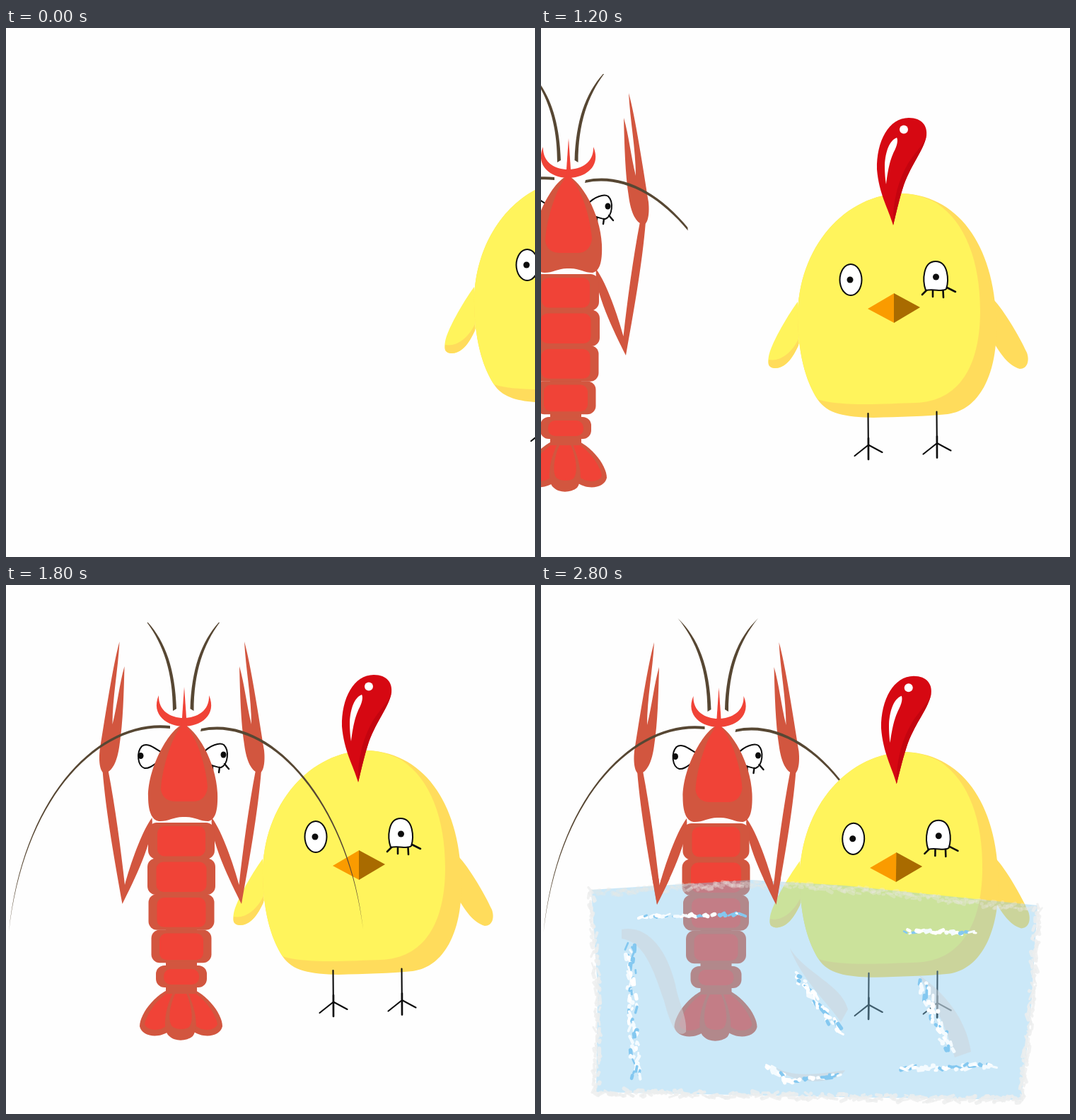
An HTML page with a canvas for the animation above (3.3 s loop, 748x748 px).

```html
<!DOCTYPE html>
<html lang="en">
<head>
<meta charset="utf-8">
<title>Shrimp and chick</title>
<style>
html, body { margin: 0; width: 100%; height: 100%; overflow: hidden; background: #fefefe; }
canvas { display: block; width: 100%; height: 100%; }
</style>
</head>
<body>
<canvas id="c" width="748" height="748"></canvas>
<script>
const g = document.getElementById('c').getContext('2d');
const LOOP = 3300, STEP = 200, SIZE = 748;
const YELLOW = '#fff45c', AMBER = '#ffdc5c', RED = '#f04337', RUST = '#d2563f', BROWN = '#574733',
      INK = '#0c0c0c', PAINT = '#f7e80b', CREAM = '#fffff0', BLOB = '#f05d4b', PAPER = '#fefefe';

// Offsets per 200 ms step; the last chick pose is its resting place.
const chickStops = [[299, -21], [255, -4], [150, 2], [73, -2], [0, 0]];
const shrimpStops = [[-303, -6], [-139, 6], [-77, -6], [0, 0], [74, -6]];

function fill(d, color) {
  g.fillStyle = color;
  g.fill(new Path2D(d));
}

function line(d, color, width) {
  g.strokeStyle = color;
  g.lineWidth = width;
  g.stroke(new Path2D(d));
}

function outlined(d, width) {
  fill(d, '#fff');
  line(d, INK, width);
}

function oval(x, y, rx, ry, color) {
  g.beginPath();
  g.ellipse(x, y, rx, ry, 0, 0, 7);
  g.fillStyle = color;
  g.fill();
}

function box(x, y, w, h, r, color) {
  g.beginPath();
  g.roundRect(x, y, w, h, r);
  g.fillStyle = color;
  g.fill();
}

function group(draw) {
  g.save();
  draw();
  g.restore();
}

function mirror(axis2, draw) {
  draw();
  group(() => {
    g.transform(-1, 0, 0, 1, axis2, 0);
    draw();
  });
}

function rng(seed) {
  return () => (seed = (seed * 16807) % 2147483647) / 2147483647;
}

const mix = (a, b, k) => a + (b - a) * k;

function leg() {
  line('M462.5 545 L463 610 M463 589.5 L443.5 605 M463 589.5 L482.5 600', INK, 2.1);
  line('M463 580 V610', INK, 2.6);
}

function chick() {
  const left = 'M512 234 C430 234 363 310 363 410 C364 470 378 505 391 525';
  fill('M363 387 C345 412 325 448 322 464 C320 475 322 481 332 481 C348 480 358 463 365 446Z', YELLOW);
  fill('M322 469 C338 472 354 460 364 440 L364 449 C355 468 345 481 330 481 C321 480 321 475 322 469Z', AMBER);
  fill('M640 384 C655 400 676 435 687 459 C691 470 688 482 677 482 C660 477 650 460 642 448Z', AMBER);
  fill(left + ' C405 546 430 550 470 551 C505 550 545 549 575 546 C620 540 644 490 644 425 C644 315 595 238 512 234Z', AMBER);
  fill(left + ' C425 536 490 531 530 530 C590 528 621 480 621 400 C621 330 600 275 560 248 C545 239 528 235 512 234Z', YELLOW);

  fill('M498 279 C491 255 478 235 475 200 C474 160 492 127 520 127 C539 127 547 139 545 153 C540 175 525 190 513 222 C507 240 502 262 498 279Z', '#d60812');
  fill('M545 153 C540 175 525 190 513 222 C507 240 502 262 498 279 C497 245 505 215 520 190 C532 172 541 165 545 153Z', '#c4040f');
  fill('M503 155 C493 159 487 174 486 194 C486 206 487 215 488 221 C491 197 494 186 499 175 C504 166 505 158 503 155Z', '#fff');
  oval(513, 143.5, 6, 6, '#fff');

  oval(438, 356, 16.5, 23, INK);
  oval(438, 356, 14.5, 21, '#fff');
  oval(437, 356, 4.5, 4.5, INK);
  outlined('M544 371 C539 357 540 330 558 330 C576 330 577 357 573 369 C567 374 556 368 544 371Z', 2);
  oval(558.5, 352, 4.5, 4.5, INK);
  line('M545 371 L539 377 M554 371 V380 M568.5 371 L569 381 M574 367 L586 373', INK, 2.6);

  fill('M462 397 L499.5 375 V417Z', '#fa9b00');
  fill('M499 375 L536 395 L499 417Z', '#a96b00');
  leg();
  group(() => {
    g.translate(97, -2.5);
    leg();
  });
}

function claw() {
  fill('M263 86 C272 118 283 190 291 240 C293 260 289 272 284 272 C273 270 266 255 263 232 C258 200 257 160 256 121 C263 145 266 175 273 203 C273 165 265 125 263 86Z', RUST);
  fill('M287 268 C282 330 269 400 259 457 C243 425 213 365 217 335 C232 355 248 402 255.5 430 C261 380 269 320 279 268Z', RUST);
}

const claws = () => mirror(349.5, claw);

function tail() {
  mirror(347, () => {
    fill('M171 573 C140 578 115 612 115 630 C118 645 143 648 158 636Z', RUST);
    fill('M166 577 C145 584 125 610 122 627 C126 637 143 637 152 630Z', RED);
  });
  fill('M168 573 C152 595 145 635 157 644 C165 652 182 651 190 644 C201 630 191 595 179 573Z', RUST);
  fill('M169 577 C158 595 153 624 162 631 C168 635 180 635 185 631 C193 620 187 595 178 577Z', RED);
}

function belly() {
  box(152, 384, 44, 200, 2, RUST);
  for (let i = 0; i < 5; i++) {
    const half = 48 - 1.25 * (i - 0.9) ** 2, y = 342 + 50.5 * i, h = 51.5 - 0.02 * i ** 5;
    const inner = half - 13 + i * 0.5;
    box(174 - half, y, half * 2, h, 12, RUST);
    box(174 - inner, y + 5, inner * 2, h - 9, 10, RED);
  }
}

function shrimp() {
  outlined('M147 243 C136 237 126 228 118 234 C110 243 112 262 122 265 C132 266 139 255 147 253Z', 2);
  oval(116.5, 247.5, 4, 4.5, INK);
  outlined('M205 243 C214 233 228 228 234 232 C242 240 240 260 230 264 C222 264 212 259 205 256Z', 2);
  oval(233.5, 246, 4, 4.5, INK);
  line('M218 262 V268 M228 264 L227 271 M235 259 L241 266', INK, 2.4);

  claws();
  fill('M158 205 C60 194 -50 301 -70 497 C-48 303 60 198 158 209Z', BROWN);
  fill('M202 209 C300 187 411 313 431 492 C409 316 300 191 201 213Z', BROWN);
  mirror(353.5, () => fill('M120 52 C149 80 165 120 167 181 L162 184 C162 125 146 84 120 52Z', BROWN));

  tail();
  belly();

  fill('M177 203 C158 208 127 262 127 305 C127 330 134 340 144 340 C156 340 165 333 178 334 C192 333 200 340 212 340 C222 338 226 325 225 300 C223 255 195 210 177 203Z', RUST);
  fill('M177 203 C163 212 146 265 145 295 C147 308 156 312 166 312 H192 C203 312 210 303 211 292 C208 255 192 212 177 203Z', RED);
  fill('M142 162 C130 190 155 206 177 206 C201 206 225 190 213 162 C214 184 196 194 177 194 C159 194 141 184 142 162Z', RED);
  fill('M178 150 L174 208 H182Z', RED);
}

// Strokes fanned out from a hub, angles in degrees, reach running from r1 to r2.
function spokes(x, y, color, width, from, to, n, r1, r2) {
  for (let i = 0; i < n; i++) {
    const k = n > 1 ? i / (n - 1) : 0;
    const a = mix(from, to, k) * Math.PI / 180, r = mix(r1, r2, k) + 6 * Math.sin(i * 2.4);
    line(`M${x} ${y} L${x + r * Math.cos(a)} ${y + r * Math.sin(a)}`, color, width);
  }
}

function soft(d, color, width) {
  group(() => {
    g.shadowColor = color;
    g.shadowBlur = 4;
    line(d, color, width);
  });
}

// A scribble that swings wider and wider along its way.
function scribble(x1, y1, x2, y2, n, sx, sy) {
  const points = Array.from({ length: n }, (_, i) => {
    const k = i / (n - 1), swing = (0.3 + 0.7 * k) * (i % 2 ? -1 : 1);
    return `${mix(x1, x2, k) + sx * swing} ${mix(y1, y2, k) + sy * swing}`;
  });
  return 'M' + points.join(' L');
}

function splat() {
  const rays = (...args) => spokes(505, 380, PAINT, ...args);
  g.beginPath();
  g.rect(225, 0, 523, 637);
  g.clip();

  oval(505, 390, 195, 205, PAINT);
  rays(20, 219, 229, 5, 290, 330);
  rays(20, 230, 244, 5, 305, 213);
  rays(20, 211, 166, 11, 232, 256);
  rays(20, 160, 150, 3, 240, 210);
  rays(18, 138, 64, 16, 250, 280);
  rays(18, 64, 33, 7, 280, 232);
  rays(18, 51, 51, 1, 328, 328);
  rays(19, 28, -33, 8, 300, 300);
  rays(15, -40, -57, 4, 370, 272);
  rays(19, -67, -76, 3, 272, 300);
  rays(20, -86, -108, 4, 232, 228);
  line('M216 313 L330 268 M284 45 Q345 85 371 124 M394 66 L402 75 M545 -5 Q543 50 531 92 M223 567 H224 M272 582 L229 638', PAINT, 18);
  fill('M429 540 L446 574 C450 585 460 585 463 576 L471 558 L473 590 L455 603 L429 598Z', PAPER);
  line('M422 590 V640', PAPER, 9);

  soft(scribble(372, 222, 442, 233, 6, -14, -26), CREAM, 16);
  soft(scribble(570, 288, 650, 332, 7, -20, 11) + ' L700 374', CREAM, 16);
  soft('M402 414 L352 453 C340 410 360 408 373 416 M410 468 L398 499 M423 463 L417 594', CREAM, 16);
  soft('M516 505 L546 527 L535 480 L586 507 M580 475 L714 605', CREAM, 16);

  oval(488, 368, 56, 64, BLOB);
  for (let a = 8; a < 368; a += 24) {
    const r = 92 + 22 * Math.cos(a * Math.PI / 180);
    spokes(488, 368, BLOB, 19, a, a, 1, r, r);
  }
  line('M648 444 Q600 440 530 380 M388 480 L440 360 M534 264 L510 340', BLOB, 18);
}

function flash() {
  g.fillStyle = PAINT;
  g.fillRect(0, 0, SIZE, SIZE);
  soft(scribble(95, 158, 192, 172, 8, -20, -46), CREAM, 19);
  soft('M214 196 L175 105 Q200 100 240 184 L375 425 L408 470', CREAM, 19);
  soft(scribble(372, 202, 483, 207, 9, 20, -55) + ' Q480 270 432 375 L418 455', CREAM, 19);
  spokes(475, 406, CREAM, 19, -67, -25, 3, 90, 102);
  soft('M470 352 L440 389 M609 408 Q570 396 497 437 L495 452 Q590 452 657 502', CREAM, 19);
  soft('M169 402 Q97 500 91 544 M175 452 Q145 510 132 575 L186 478 Q155 590 141 658 L158 642', CREAM, 19);
  soft('M214 557 Q190 630 167 756 M369 551 Q388 575 405 630 M528 530 L622 627 Q550 580 490 559 Q540 580 586 636 L568 632', CREAM, 19);
}

// Rough patches scattered along a straight run.
function crumbs(x1, y1, x2, y2, spread, colors, rand, density) {
  const n = Math.ceil(Math.hypot(x2 - x1, y2 - y1) * density);
  const a = Math.atan2(y2 - y1, x2 - x1);
  for (let i = 0; i < n; i++) {
    const k = (i + rand()) / n, off = (rand() - 0.5) * spread;
    const w = 2.5 + rand() * 4.5, h = 1.2 + rand() * 2;
    group(() => {
      g.translate(mix(x1, x2, k) - Math.sin(a) * off, mix(y1, y2, k) + Math.cos(a) * off);
      g.rotate(a + (rand() - 0.5) * 1.2);
      box(-w, -h, w * 2, h * 2, h, colors[Math.floor(rand() * colors.length)]);
    });
  }
}

function ice() {
  const rand = rng(77);
  const rim = [[71, 431], [297, 417], [430, 425], [702, 453], [693, 600], [679, 728], [420, 724], [78, 717], [80, 570]];
  fill('M' + rim.join(' L') + 'Z', 'rgba(136,201,239,.43)');

  const haze = 'rgba(205,212,218,.5)';
  fill('M114 487 C150 480 178 515 190 565 C194 590 207 610 205 632 C190 645 180 610 174 588 C158 540 145 505 114 500Z', haze);
  fill('M352 514 C375 550 425 565 434 600 L424 618 C405 590 370 560 352 514Z', haze);
  fill('M535 552 C570 575 602 615 608 660 L585 668 C575 630 560 600 535 552Z', haze);
  fill('M325 677 C350 700 400 690 430 686 C420 705 360 712 325 677Z', haze);

  rim.forEach(([x, y], i) => {
    const [u, v] = rim[(i + 1) % rim.length];
    const color = i < 3 ? 'rgba(235,232,226,.35)' : 'rgba(236,237,238,.8)';
    const sink = i < 3 ? 5 : 0;
    crumbs(x, y + sink, u, v + sink, 9, [color], rand, 0.3);
  });

  const frost = (x1, y1, x2, y2, spread) =>
    crumbs(x1, y1, x2, y2, spread, ['#fff', '#f4fbff', '#84c8f0'], rand, 0.14 + spread / 60);
  frost(126, 508, 134, 698, 13);
  frost(360, 550, 425, 635, 12);
  frost(538, 560, 578, 660, 14);
  frost(510, 685, 642, 679, 8);
  frost(319, 678, 350, 702, 7);
  frost(350, 702, 426, 692, 4);
  frost(512, 490, 616, 491, 4);
  frost(137, 469, 285, 466, 3);
}

function frozen() {
  const place = () => g.translate(73.5, -5);
  group(() => {
    place();
    shrimp();
  });
  group(() => {
    g.transform(1, 0, -0.0143, 1.005, 8.8, 1);
    chick();
  });
  ice();
  // The arms stick out of the ice.
  group(() => {
    g.beginPath();
    g.rect(0, 415, SIZE, 60);
    g.clip();
    place();
    claws();
  });
}

function walk(step) {
  group(() => {
    g.translate(...chickStops[Math.min(step, 4)]);
    chick();
  });
  if (step < 5) return;
  group(() => {
    g.translate(...shrimpStops[step - 5]);
    g.beginPath();
    g.rect(-400, 59, step < 9 ? 746.5 : 1000, 700);
    g.clip();
    shrimp();
  });
}

function render(step) {
  g.fillStyle = PAPER;
  g.fillRect(0, 0, SIZE, SIZE);
  g.lineCap = g.lineJoin = 'round';
  if (step < 10) walk(step);
  else if (step < 12) group(splat);
  else if (step < 14) flash();
  else frozen();
}

let shown = -1;
const start = performance.now();
function tick() {
  const step = Math.floor(((performance.now() - start) % LOOP) / STEP);
  if (step !== shown) render(shown = step);
  requestAnimationFrame(tick);
}
tick();
</script>
</body>
</html>
```
